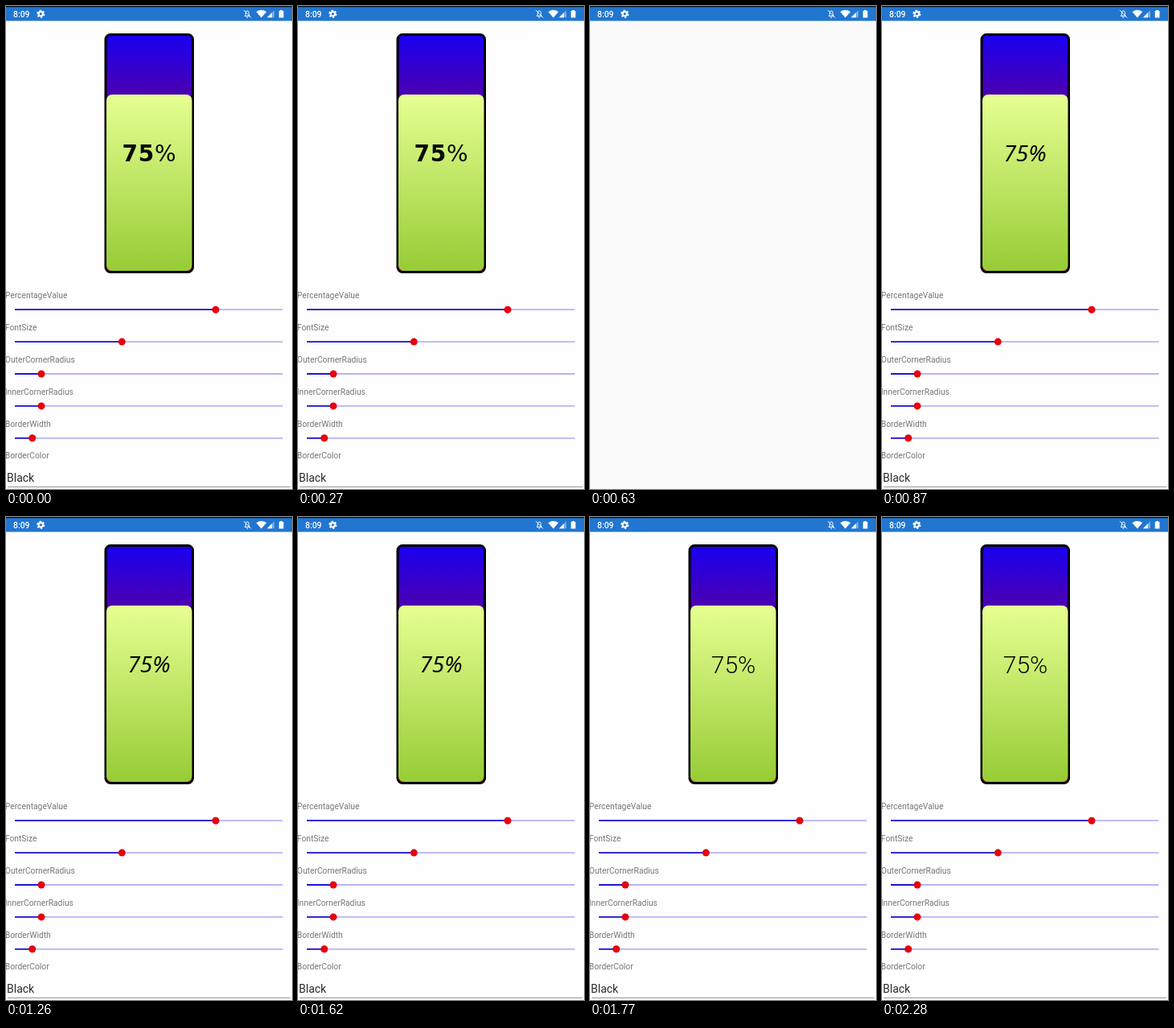
An HTML page for the animation above (2310 ms loop, 356 by 600 pixels).

```html
<!DOCTYPE html>
<html lang="en">
<head>
<meta charset="utf-8">
<title>Progress bar fonts</title>
<style>
  html, body { margin: 0; width: 100%; height: 100%; overflow: hidden; background: #fafafa; }
  svg { display: block; width: 356px; height: 600px; }
  text { font-family: Roboto, sans-serif; }
  .label { font-size: 10.3px; fill: #777; }
  .value { text-anchor: middle; fill: #080a04; }
  .wide { font: 700 28px "DejaVu Sans", sans-serif; }
  .wide tspan { font-weight: 400; }
  .slant { font: italic 500 28px "Noto Sans", sans-serif; }
  .plain { font: 300 30px Roboto, sans-serif; }
</style>
</head>
<body>
<svg viewBox="0 0 356 600">
  <defs>
    <linearGradient id="back" x2="0" y2="1">
      <stop stop-color="#1800f0"/><stop offset=".25" stop-color="#4b00b2"/><stop offset="1" stop-color="#f00010"/>
    </linearGradient>
    <linearGradient id="level" x2="0" y2="1">
      <stop stop-color="#e6ff92"/><stop offset="1" stop-color="#97cc36"/>
    </linearGradient>
  </defs>
  <rect width="356" height="600" fill="#fafafa"/>

  <g id="page">
    <rect y="18" width="356" height="582" fill="#fefefe"/>
    <rect x="124" y="35.5" width="108.5" height="295" rx="6" fill="url(#back)"/>
    <rect x="124" y="35.5" width="108.5" height="295" rx="6" fill="none" stroke="#000" stroke-width="3"/>
    <rect x="125" y="110" width="106.5" height="219" rx="7" fill="url(#level)"/>
    <text class="value wide" x="178.5" y="193" letter-spacing=".8">75<tspan>%</tspan></text>
    <text class="value slant" x="178" y="193">75%</text>
    <text class="value plain" x="178.5" y="193.5">75%</text>
    <g id="sliders"></g>
    <text class="label" x="-1.2" y="562">BorderColor</text>
    <text x="1" y="591" font-size="14" fill="#2c2c2c">Black</text>
    <path d="M2 597.3H354" stroke="#8c8c8c"/>
  </g>

  <g id="status" fill="#fff">
    <rect width="356" height="18.5" fill="#2176d0"/>
    <rect width="356" height="1.3" fill="#06101c"/>
    <text x="9" y="13.6" font-size="10.4" font-weight="500">8:09</text>
    <circle cx="43.3" cy="9.8" r="2.7" fill="none" stroke="#fff" stroke-width="2.1"/>
    <circle cx="43.3" cy="9.8" r="4.3" fill="none" stroke="#fff" stroke-width="1.6" stroke-dasharray="2.3 2.2"/>
    <path d="M297.3 12.5H303.3L302.3 11V8.5Q302.3 6 300.3 6T298.3 8.5V11ZM296 5.2L305 14.5M299.3 14.3H301.3" fill="none" stroke="#fff"/>
    <path d="M311.5 7.3Q317.8 2.8 324.2 7.3L317.8 14.5Z"/>
    <path d="M325 14.3L334 5.3V14.3Z" opacity=".4"/>
    <path d="M325 14.3L331 8.3V14.3Z"/>
    <path d="M339.8 6H341.3V5H344V6H345.5V14.5H339.8Z"/>
  </g>
</svg>
<script>
const LOOP = 2310;
// start time and visible font; null leaves the page empty while it reloads
const STEPS = [[0, "wide"], [570, null], [720, "slant"], [1650, null], [1740, "plain"]];

const sliders = [
  ["PercentageValue", 261], ["FontSize", 144.3], ["OuterCornerRadius", 44],
  ["InnerCornerRadius", 44], ["BorderWidth", 32.7]
];
document.getElementById("sliders").innerHTML = sliders.map(([name, x], i) => {
  const y = 377.2 + i * 39.9;
  return `<text class="label" x="-1.2" y="${y - 14}">${name}</text>
    <path d="M11 ${y}H344.5" stroke="#b8b4f5" stroke-width="1.8"/>
    <path d="M11 ${y}H${x}" stroke="#2014d2" stroke-width="1.8"/>
    <circle cx="${x}" cy="${y}" r="4.5" fill="#e6000c"/>`;
}).join("");

const page = document.getElementById("page");
const values = [...document.querySelectorAll(".value")];

function draw() {
  const t = performance.now() % LOOP;
  const font = STEPS.filter(([start]) => start <= t).pop()[1];
  page.style.display = font ? "" : "none";
  for (const v of values) v.style.display = v.classList.contains(font) ? "" : "none";
  requestAnimationFrame(draw);
}
draw();
</script>
</body>
</html>
```
